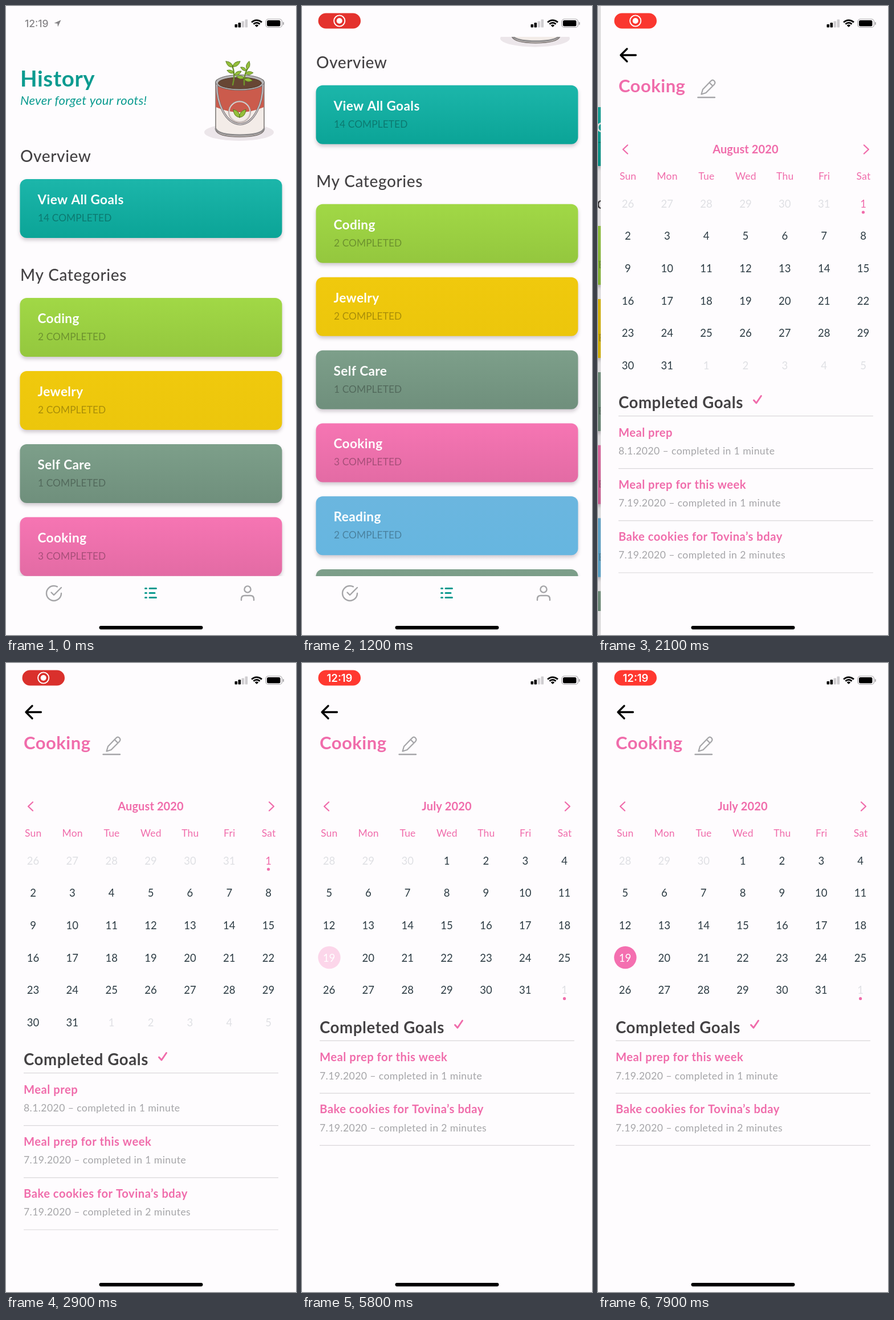
Recreate the animation shown at these times as an HTML page with a canvas. Size 509 by 1101 pixels, loop 8 s.

```html
<!DOCTYPE html>
<html lang="en">
<head>
<meta charset="utf-8">
<title>Goal history</title>
<style>
html, body { margin: 0; width: 100%; height: 100%; overflow: hidden; background: #fefcfe; }
canvas { display: block; width: 509px; height: 1101px; }
</style>
</head>
<body>
<canvas id="stage"></canvas>
<script>
const W = 509, H = 1101, LOOP = 8000;
const PAGE = '#fefcfe', PINK = '#f06cab', TEAL = '#0b9b90', DARK = '#444244', GRAY = '#a5a5a8';
const canvas = document.getElementById('stage');
const ctx = canvas.getContext('2d');
const dpr = window.devicePixelRatio || 1;
canvas.width = W * dpr;
canvas.height = H * dpr;

const CARDS = [
  ['View All Goals', 14, 303, '#1cb6aa', '#0ba497'],
  ['Coding', 2, 511, '#a1d846', '#94c73e'],
  ['Jewelry', 2, 639, '#f0c90d', '#ecc60c'],
  ['Self Care', 1, 767, '#7d9f8a', '#6f8f7c'],
  ['Cooking', 3, 894.7, '#f675b3', '#e36ba4'],
  ['Reading', 2, 1022.5, '#6bb6df', '#66b6e0'],
  ['Running', 1, 1150.3, '#7d9f8a', '#6f8f7c'],
];
const GOALS = [
  ['Meal prep', '8.1.2020 – completed in 1 minute'],
  ['Meal prep for this week', '7.19.2020 – completed in 1 minute'],
  ['Bake cookies for Tovina’s bday', '7.19.2020 – completed in 2 minutes'],
];
const DAYS = ['Sun', 'Mon', 'Tue', 'Wed', 'Thu', 'Fri', 'Sat'];

// Timing helpers
const ramp = (t, a, b) => Math.min(1, Math.max(0, (t - a) / (b - a)));
const ease = (t, a, b) => { const u = ramp(t, a, b); return u * u * (3 - 2 * u); };
const spring = (t, start) => {
  const u = Math.max(0, t - start) * 0.01826;
  return u > 12 ? 1 : 1 - (1 + u) * Math.exp(-u);
};

// Drawing helpers
function text(str, x, y, font, color, spacing = 0, align = 'left') {
  ctx.font = font + ', sans-serif';
  ctx.letterSpacing = spacing + 'px';
  ctx.textAlign = align;
  ctx.fillStyle = color;
  ctx.fillText(str, x, y);
}
function box(x, y, w, h, r, fill) {
  ctx.beginPath();
  ctx.roundRect(x, y, w, h, r);
  ctx.fillStyle = fill;
  ctx.fill();
}
function ellipse(x, y, rx, ry, fill, line, width = 1) {
  ctx.beginPath();
  ctx.ellipse(x, y, rx, ry, 0, 0, Math.PI * 2);
  if (fill) { ctx.fillStyle = fill; ctx.fill(); }
  if (line) { ctx.strokeStyle = line; ctx.lineWidth = width; ctx.stroke(); }
}
function path(d, line, width, fill) {
  const p = new Path2D(d);
  if (fill) { ctx.fillStyle = fill; ctx.fill(p); }
  if (line) { ctx.strokeStyle = line; ctx.lineWidth = width; ctx.stroke(p); }
}
function scoped(draw) { ctx.save(); draw(); ctx.restore(); }

function leaf(x, y, angle, length) {
  scoped(() => {
    ctx.translate(x, y);
    ctx.rotate(angle * Math.PI / 180);
    const l = length, w = length * 0.42;
    path(`M0 0 Q${l * 0.4} ${-w} ${l} 0 Q${l * 0.4} ${w} 0 0Z`, '#53731f', 0.8, '#94bf3a');
  });
}

function plantCan(t) {
  ellipse(409, 221, 61, 15, '#ece6ea');
  const body = 'M368 134 V217 Q372 229 410 229 Q449 229 453 217 V134Z';
  path(body, '#77706e', 1.5, '#f3ece8');
  path('M368.5 134 V177 Q410 195 452.5 177 V134Z', null, 0, '#cb5b4c');
  path('M368 215 Q374 226 410 226 Q447 226 453 215', '#8d8b8c', 3);
  ellipse(410.5, 134, 43, 13.5, '#b9b7b8', '#6d6a6b', 1.2);
  ellipse(410.5, 135, 38, 10, '#674634', '#4d3528', 1);
  ellipse(410, 185, 18.5, 18, null, '#d8d1d0', 2.4);
  ellipse(410, 185, 19.5, 19, null, '#8e7772', 0.7);
  leaf(410, 195, -128, 18);
  leaf(410, 195, -52, 18);
  const handle = 'M370 138 C370 170 385 206 411 207 C436 206 451 170 451 138';
  path(handle, '#777274', 3.6);
  path(handle, '#c9c5c7', 1.8);

  scoped(() => {
    ctx.translate(409, 138);
    ctx.rotate(0.09 * Math.sin(t / 1600 * Math.PI));
    ctx.translate(-409, -138);
    path('M398 138 Q403 120 397 104 M418 138 Q417 122 424 109', '#6f962b', 2.4);
    leaf(398, 107, -140, 16);
    leaf(398, 106, -35, 16);
    leaf(400, 117, -160, 13);
    leaf(401, 121, -30, 14);
    leaf(422, 113, -150, 12);
    leaf(423, 111, -75, 15);
    leaf(420, 118, -5, 14);
    leaf(418, 126, -170, 14);
    leaf(418, 128, 10, 15);
  });
}

function card([title, count, y, top, bottom], opacity) {
  scoped(() => {
    ctx.globalAlpha = opacity;
    const shade = ctx.createLinearGradient(0, y, 0, y + 103);
    shade.addColorStop(0, top);
    shade.addColorStop(1, bottom);
    scoped(() => {
      ctx.shadowColor = 'rgba(60,40,60,.24)';
      ctx.shadowBlur = 6 * dpr;
      ctx.shadowOffsetY = 4 * dpr;
      box(24.5, y, 460, 103, 12, shade);
    });
    text(title, 55.5, y + 44, '700 22.6px Lato', '#fff', 0.4);
    text(count + ' COMPLETED', 56, y + 74, '400 17.3px Lato', 'rgba(0,0,0,.29)', 0.1);
  });
}

function tabBar() {
  box(0, 998, W, H - 998, 0, PAGE);
  ctx.beginPath();
  ctx.arc(84, 1028, 13, 0, Math.PI * 2 - 1.1);
  ctx.strokeStyle = GRAY;
  ctx.lineWidth = 2.4;
  ctx.stroke();
  path('M97 1018 L84 1031 L79.5 1026.5', GRAY, 2.4);
  path('M244.5 1019.5 h2 M252 1019.5 h11.5 M244.5 1027.5 h2 M252 1027.5 h9 M244.5 1035.5 h2 M252 1035.5 h11.5', TEAL, 3);
  ellipse(424, 1021, 5.6, 5.6, null, GRAY, 2.4);
  path('M413 1040 v-2 q0 -6 6 -6 h10 q6 0 6 6 v2', GRAY, 2.4);
}

function historyPage(t, push) {
  const scroll = ramp(t, 600, 800) + 186 * ease(t, 800, 1313);
  const opacity = {
    'Self Care': 1 - 0.24 * ramp(t, 700, 800) * (1 - ramp(t, 800, 950)),
    'Cooking': 1 - 0.65 * ramp(t, 1550, 1650) * (1 - ramp(t, 1700, 1850)),
  };
  // The list drops into the space of the tab bar once that hides
  const drop = push > 0 ? 61 : 0;
  box(0, 0, W, H, 0, PAGE);
  scoped(() => {
    ctx.translate(0, drop);
    ctx.beginPath();
    ctx.rect(0, 54, W, 944);
    ctx.clip();
    ctx.translate(0, -scroll);
    text('History', 25, 140.5, '700 38.5px Lato', TEAL, 0.6);
    text('Never forget your roots!', 25, 173, 'italic 400 22px Lato', TEAL, 0.25);
    plantCan(t);
    text('Overview', 25, 273, '500 28px Lato', DARK, 0.6);
    text('My Categories', 25, 481, '500 28px Lato', DARK, 0.6);
    for (const c of CARDS) card(c, opacity[c[0]] ?? 1);
  });
  if (push === 0) tabBar();
}

function calendar(july, t) {
  const lead = july ? 3 : 6;
  const length = 31, previous = july ? 30 : 31, weeks = july ? 5 : 6;
  const selected = july && t >= 5700;
  text(july ? 'July 2020' : 'August 2020', 254, 258, '700 20px Lato', PINK, 0.1, 'center');
  path('M47 243.5 L39 251 L47 258.5 M462 243.5 L470 251 L462 258.5', PINK, 2.3);
  DAYS.forEach((day, c) => text(day, 47.7 + 68.9 * c, 304, '400 17.5px Lato', PINK, 0.2, 'center'));

  for (let i = 0; i < weeks * 7; i++) {
    const n = i + 1 - lead;
    const outside = n < 1 || n > length;
    const label = n < 1 ? previous + n : n > length ? n - length : n;
    const x = 47.5 + 68.85 * (i % 7), y = 346 + 56.6 * Math.floor(i / 7);
    const goalDay = july ? n === 19 || n === 32 : n === 1;
    const today = !july && n === 1;
    const picked = selected && n === 19;
    if (picked) {
      const alpha = 0.27 + 0.73 * ease(t, 5850, 6100);
      ellipse(x + 0.4, y - 0.3, 19.7, 19.7, `rgba(244,111,176,${alpha})`);
    }
    const color = picked ? '#fff' : today ? PINK : outside ? '#dfe0e4' : '#2d3c44';
    text(label, x, y + 6.8, '400 18.5px Lato', color, 0, 'center');
    if (goalDay && !picked) ellipse(x, y + 15, 2.6, 2.6, PINK);
  }
}

function detailPage(t) {
  const july = t >= 4200;
  box(0, 0, W, H, 0, PAGE);
  path('M61.5 86 H35 M46 75 L35 86 L46 97', '#000', 3.3);
  text('Cooking', 31, 151, '700 31px Lato', PINK, 0.5);
  path('M176.5 154.5 L179 146 L193 131.5 Q196 128 199 131 Q202 134 199 137.5 L184.5 152 Z M190.5 134 L196.5 140', GRAY, 2.2);
  path('M170.5 160 H200', GRAY, 2.4);
  calendar(july, t);

  scoped(() => {
    ctx.translate(0, july ? -56.5 : 0);
    text('Completed Goals', 31, 704, '700 27.6px Lato', DARK, 0.6);
    path('M268.5 690 L273 695 L281.5 682.5', PINK, 3);
    box(31, 717, 447, 1.2, 0, '#d9d7da');
    const goals = t >= 5700 ? GOALS.slice(1) : GOALS;
    goals.forEach(([title, note], i) => {
      const y = 91.2 * i;
      text(title, 31, 753.5 + y, '700 20.2px Lato', PINK, 0.5);
      text(note, 31, 785 + y, '400 17.6px Lato', GRAY, 0.4);
      box(31, 809 + y, 447, 1.2, 0, '#d9d7da');
    });
  });
}

function statusBar(t) {
  const pill = ramp(t, 350, 500);
  const clock = ramp(t, 4250, 4450);
  scoped(() => {
    ctx.globalAlpha = 1 - pill;
    text('12:19', 33, 37, '500 17.5px Inter', '#858386');
    path('M96.5 24.5 L84.5 30 L90.3 30.8 L91 36.5Z', null, 0, '#858386');
  });
  scoped(() => {
    const glow = (1 + Math.cos((t - 1850) / 1000 * Math.PI)) / 2;
    ctx.globalAlpha = pill;
    box(28.5, 12.5, 74.5, 27, 13.5, `rgb(${218 + 37 * glow},${48 + 8 * glow},${44 + 4 * glow})`);
    ctx.globalAlpha = pill * (1 - clock);
    ellipse(65.7, 26, 9.6, 9.6, null, '#fff', 1.9);
    ellipse(65.7, 26, 5, 5, '#fff');
    ctx.globalAlpha = pill * clock;
    text('12:19', 66, 32.7, '600 18.5px Inter', '#fff', 0, 'center');
  });

  for (let i = 0; i < 4; i++) {
    const h = 5.5 + 2.8 * i;
    box(401.5 + 6 * i, 37.5 - h, 4.6, h, 1, i < 2 ? '#000' : '#cfcdd0');
  }
  scoped(() => {
    ctx.lineCap = 'butt';
    ctx.strokeStyle = '#000';
    for (const [r, w] of [[12.2, 2.8], [7.6, 2.8], [2.2, 4.4]]) {
      ctx.beginPath();
      ctx.arc(440, 37, r, -Math.PI * 0.76, -Math.PI * 0.24);
      ctx.lineWidth = w;
      ctx.stroke();
    }
  });
  ctx.beginPath();
  ctx.roundRect(456, 23, 28.5, 14.5, 4.5);
  ctx.strokeStyle = '#a3a1a4';
  ctx.lineWidth = 1.2;
  ctx.stroke();
  box(458, 25, 23.5, 10.5, 2.5, '#000');
  box(486, 28, 1.8, 5, 1, '#a3a1a4');
}

function render(t) {
  const push = spring(t, 1735);
  ctx.setTransform(dpr, 0, 0, dpr, 0, 0);
  ctx.lineCap = ctx.lineJoin = 'round';
  if (push < 1) {
    scoped(() => {
      ctx.translate(-0.3 * W * push, 0);
      historyPage(t, push);
    });
    box(0, 0, W, H, 0, `rgba(0,0,0,${0.09 * push})`);
  }
  if (push > 0) {
    scoped(() => {
      ctx.translate(W * (1 - push), 0);
      scoped(() => {
        ctx.shadowColor = 'rgba(0,0,0,.15)';
        ctx.shadowBlur = 8 * dpr;
        box(0, 0, W, H, 0, PAGE);
      });
      detailPage(t);
    });
  }
  statusBar(t);
  box(163.5, 1085, 182, 6.2, 3.1, '#000');
}

function tick() {
  render(performance.now() % LOOP);
  requestAnimationFrame(tick);
}
tick();
</script>
</body>
</html>
```
